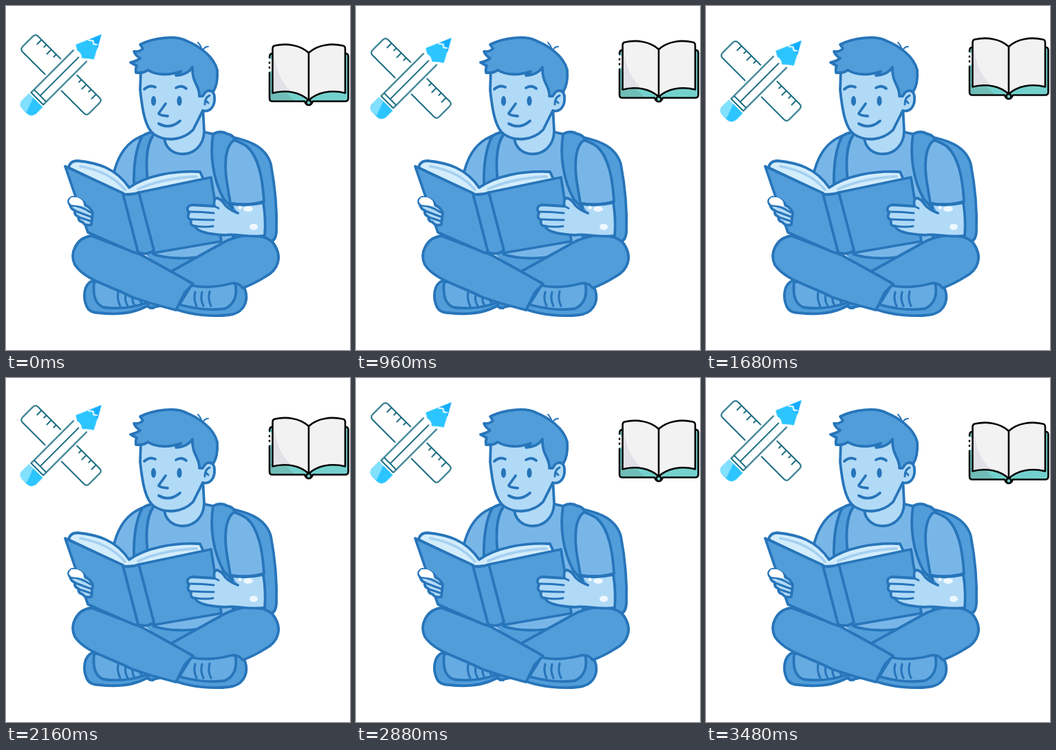
Recreate the animation shown at these times as an HTML page. Size 500 by 500 pixels, loop 3600 ms.

```html
<!DOCTYPE html>
<html lang="en">
<head>
<meta charset="utf-8">
<title>Reading</title>
<style>
html, body { margin: 0; width: 100%; height: 100%; overflow: hidden; background: #fff; }
svg { display: block; width: 100vw; height: 100vh; }
.man { stroke: #2775ba; stroke-width: 3.8; stroke-linejoin: round; stroke-linecap: round; }
.deep { fill: #519dda; }
.shoe { fill: #66abe2; }
.shirt { fill: #79b6e8; }
.skin { fill: #b1daf7; }
.page { fill: #d3edfc; }
.line { fill: none; }
.flat { stroke: none; }
.tools { fill: none; stroke: #176b80; stroke-width: 2; stroke-linecap: round; stroke-linejoin: round; }
.book { fill: none; stroke: #050505; stroke-width: 2.6; stroke-linecap: round; stroke-linejoin: round; }
</style>
</head>
<body>
<svg viewBox="0 0 500 500">
<g class="man">
  <!-- backpack and shirt -->
  <path class="deep" d="M312 187C350 194 377 202 385 230C391 262 394 300 393 328Q392 342 383 343L330 338Z"/>
  <path class="deep flat" d="M195 355L320 340L240 392Z"/>
  <path class="shirt" d="M229 185C205 183 168 190 156 246L170 300L215 361C235 368 268 368 290 363L330 340L329 287Q352 291 375 284C373 253 368 220 350 204C336 194 312 189 288 183Z"/>
  <path class="deep" d="M218 183C206 194 202 220 206 255L186 264C185 232 188 208 198 189Q207 183 218 183Z"/>
  <path class="deep" d="M301 186Q312 180 322 186Q329 187 333 194C317 203 317 235 322 262L327 292L316 280C301 252 296 217 301 186Z"/>

  <!-- neck and head -->
  <path class="skin" d="M230 188C229 225 287 225 288 182L286 145L235 165Z"/>
  <path class="skin" d="M196 92L195 122C198 150 202 178 216 187C232 197 256 196 272 180L286 152C296 155 304 146 303 133C303 122 293 119 287 126L270 85Z"/>
  <path class="line" stroke-width="3" d="M296 130Q289 133 289 143M290 137L294 141"/>
  <path class="deep" d="M195 97L189 97Q188 91 190 87L181 82Q190 80 195 76Q188 72 186 66Q194 67 199 62L195 56C215 46 247 42 263 51C278 57 302 72 307 93C308 108 305 119 301 125Q292 119 286 131L281 131C282 116 270 112 271 89Q264 100 247 101L254 95C238 101 218 101 206 93Q201 97 195 97Z"/>
  <path class="line" stroke-width="2" d="M285 63Q283 57 279 53M286 64Q289 59 294 59"/>
  <path class="line" d="M201 121Q209 114 217 118M247 119Q255 114 262 120M232 142L222 156Q222 159 235 160M222 171Q238 180 253 167"/>
  <g class="flat" fill="#2775ba">
    <ellipse cx="214.500" cy="138" rx="3.600" ry="7.200"/>
    <ellipse cx="252" cy="138" rx="3.600" ry="7.200"/>
  </g>

  <!-- shoes and legs -->
  <path class="deep" d="M126 399C112 405 112 424 117 436Q121 446 135 446C160 449 185 447 205 436L210 439L228 435L210 405Z"/>
  <path class="shoe" d="M128 401C126 420 130 434 142 438C164 441 185 438 203 432L206 405L150 400Z"/>
  <path class="line" stroke-width="3.200" d="M163 416Q161 426 166 436M174 420Q172 428 177 436M184 423Q183 430 187 435M194 426L197 432"/>
  <path class="deep" d="M247 441C270 449 300 452 324 449C344 447 351 432 349 418C347 407 341 400 330 399L272 402Z"/>
  <path class="shoe" d="M333 402C337 420 332 434 318 440C296 443 274 440 252 434L270 405Z"/>
  <path class="line" stroke-width="3.200" d="M275 416Q272 426 277 436M285 416Q282 426 287 436M296 415Q293 426 298 436"/>
  <path class="deep" d="M238 387L312 346C340 329 374 330 388 344C403 364 396 384 376 394Q362 403 344 410Q337 400 324 404C304 409 286 410 268 406Z"/>
  <path class="deep" d="M124 334C102 337 92 359 100 376C115 399 151 406 183 423L210 432L247 442L260 416L272 404C250 391 220 375 197 362Z"/>
  <path class="line" d="M207 432Q204 438 214 439"/>

  <!-- held book -->
  <path class="page" d="M91 235Q93 225 104 225C134 228 160 236 179 264C203 247 242 239 282 241L287 252L195 273L172 274Z"/>
  <path class="line" stroke="#a5d0f1" d="M108 233C136 238 157 248 173 267M192 266C215 256 244 249 277 248"/>
  <path class="deep" d="M86 233L170 272L192 356Q192 361 183 357L119 329Z"/>
  <path class="deep" d="M193 271L298 249L313 342L214 359Z"/>
  <path class="deep" d="M170 273Q181 276 193 271L215 355Q205 363 192 358Z"/>

  <!-- hands -->
  <path class="skin" d="M96 278Q88 282 93 289Q95 296 100 297Q99 304 105 306Q105 313 111 314Q115 320 124 318L126 300Q122 292 116 290Q112 280 96 278Z"/>
  <path class="line" stroke-width="3" d="M95 290Q108 290 123 300M101 298L125 307M106 307L124 313"/>
  <path class="flat" fill="#fff" d="M95 278Q88 284 95 289L113 291Q114 281 103 278Z"/>
  <path class="skin" d="M329 288Q352 291 374 286Q378 311 376 334C350 337 333 330 318 333C302 332 278 330 275 320Q267 320 269 311Q262 308 266 301Q260 292 270 289L303 291Q301 281 306 279Q313 280 319 290Q326 297 337 301"/>
  <path class="line" stroke-width="3" d="M266 299Q285 299 302 301M269 310Q286 311 302 311M276 320Q290 322 301 320M303 291L309 294"/>
  <path class="line" d="M329 287Q352 291 375 284"/>
  <g class="flat" fill="#eef8fe">
    <ellipse cx="352" cy="295" rx="7" ry="4"/>
    <ellipse cx="360" cy="321" rx="6" ry="4.500"/>
    <circle cx="340" cy="293" r="2.500"/>
  </g>
</g>

<g id="tools">
  <g class="tools" transform="translate(80 100) rotate(-45)">
    <path d="M-16 -17V-63Q-16 -68.500 -10.500 -68.500H10.500Q16 -68.500 16 -63V-17M-16 17V63Q-16 68.500 -10.500 68.500H10.500Q16 68.500 16 63V17"/>
    <path d="M16 -56H7M16 -46H11M16 -36H7M16 -26H11M16 26H11M16 36H7M16 46H11M16 56H7"/>
    <path fill="#fff" d="M38 -12.500H-49V12.500H40M36 0H-43M-43 -12.500V12.500"/>
    <g stroke="none">
      <path fill="#2cc5ff" d="M83 0L46 -16L41.500 -8Q44 -2 38.500 4.500Q45 11 49.500 18Z"/>
      <path fill="#14adff" d="M83 0L66 -7L69 -1L64 11Z"/>
      <path d="M64 -7L68 -2L65 2L68 6" stroke="#fff" stroke-width="2"/>
      <path fill="#2cc5ff" d="M-52 -14V14.500H-66Q-75 13 -75 4V-5Q-74 -14 -65 -14Z"/>
      <path fill="#82e0ff" d="M-52 -14V-5L-74 3L-75 -5Q-74 -14 -65 -14Z"/>
    </g>
  </g>
</g>

<g id="book">
  <g class="book">
    <path stroke="none" fill="#73d1cd" d="M386 69H494Q498 69 498 73V135Q498 139 494 139H386Q382 139 382 135V73Q382 69 386 69Z"/>
    <path stroke="none" fill="#70bdb7" d="M383 122L405 124L420 138H386Q383 138 383 135Z"/>
    <path stroke="none" fill="#fff" d="M381 77H386V95H381Z"/>
    <path d="M387 69Q383 69 383 75M383 82V83M383 89V90M383 97V134Q383 138.500 387 138.500H434Q436 144 440 144T446 138.500H493Q497.500 138.500 497.500 134V73Q497.500 69 493 69"/>
    <path fill="#f2f2f3" d="M440 68C427 56 407 54 391 57.500Q387.500 58 387.500 62V126.500C408 121 428 126 440 137C452 126 472 121 493 126.500V62Q493 58 489 57.500C473 54 453 56 440 68Z"/>
    <path stroke="none" fill="#e1e1e7" d="M389 61C390 88 398 108 413 123Q400 122 389 124.500Z"/>
    <path d="M440 68V137"/>
    <circle cx="440" cy="140.500" r="3.500" fill="#73d1cd"/>
  </g>
</g>
</svg>
<script>
const LOOP = 3600, HALF = 10;

// Twenty held poses, lasting 240 and 120 ms in turn.
const startOf = k => Math.floor(k / 2) * 360 + (k % 2) * 240;
const shiftAt = k => k < HALF ? k : HALF - k;

function drift(id, dir) {
  const frames = [];
  for (let k = 0; k < 2 * HALF; k++) {
    frames.push({
      offset: startOf(k) / LOOP,
      transform: `translateY(${dir * shiftAt(k)}px)`,
      easing: "steps(1, end)"
    });
  }
  frames.push({ offset: 1, transform: "translateY(0px)" });
  document.getElementById(id).animate(frames, { duration: LOOP, iterations: Infinity });
}

drift("tools", 1);
drift("book", -1);
</script>
</body>
</html>
```
